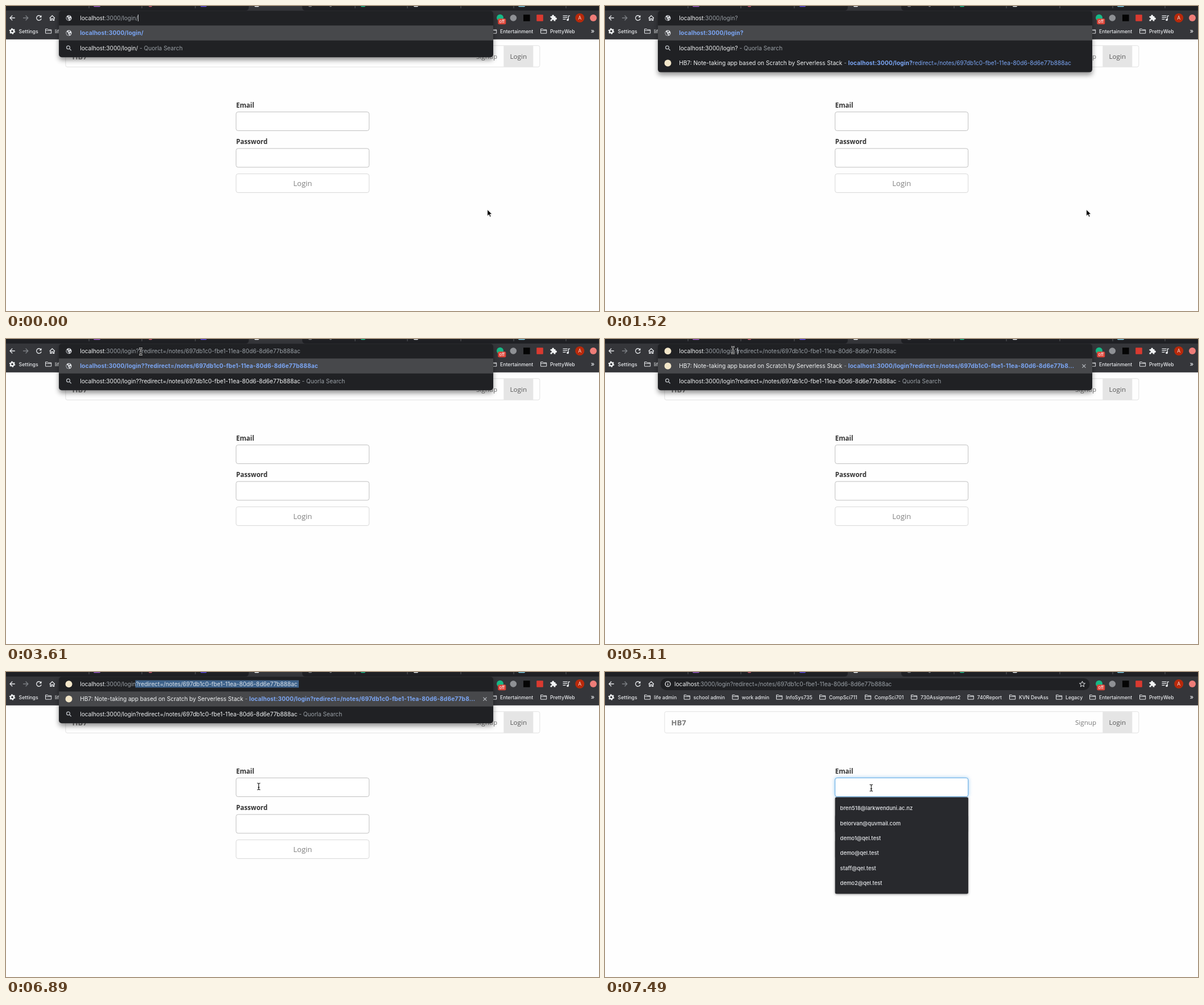
Recreate the animation shown at these times as an HTML page. Size 1043 px wide and 537 px high, loop 8 s.

```html
<!DOCTYPE html>
<html lang="en">
<head>
<meta charset="utf-8">
<title>Login redirect</title>
<style>
  html, body { margin: 0; width: 100%; height: 100%; overflow: hidden; background: #fefefe; }
  svg { display: block; width: 1043px; height: 537px; }
  text { white-space: pre; }
  .ui { font: 400 10.12px Inter, Roboto, sans-serif; fill: #9aa0a6; }
  .marks { font: 500 8.69px Inter, Roboto, sans-serif; fill: #e8eaed; }
  .mail { font: 500 9.41px Inter, Roboto, sans-serif; fill: #e8eaed; }
  .page { font: 400 11.6px "Open Sans", "Noto Sans", sans-serif; fill: #777; }
  .big { font-size: 13.03px; }
  .brand { font-weight: 700; }
  .label { font-weight: 700; fill: #333; }
  .w { fill: #f1f3f4; }
  .b { fill: #7ba6f5; font-weight: 700; letter-spacing: .17px; }
  .l { fill: #7ba6f5; }
  .field { fill: #fff; stroke: #c0c0c0; }
  .line { fill: none; stroke: #e8eaed; stroke-width: 1.3; }
  .menu { filter: drop-shadow(0 5px 4px rgba(0, 0, 0, .42)); }
  .list { filter: drop-shadow(0 1px 2px rgba(0, 0, 0, .4)); }
  .focus { fill: #fff; stroke: #66afe9; filter: drop-shadow(0 0 3px rgba(102, 175, 233, .7)); }
</style>
</head>
<body>
<svg viewBox="0 0 1043 537" xmlns="http://www.w3.org/2000/svg">
  <defs>
    <g id="globe">
      <circle r="5" fill="#dadce0"/>
      <path d="M-4 -2.6L-1 -.4L-1.2 1.6L.3 2.4L-.4 4.6Q-4.2 3.6 -4.4 0ZM.2 -4.4L2 -3.4L1 -1.6L-.8 -1.8ZM1.2 .2L3.6 .4L3.4 2.4L2 2.8Z" fill="#4a4c50"/>
    </g>
    <g id="find" class="line" style="stroke:#bdc1c6"><circle cx="-1" cy="-1" r="2.9"/><path d="M1.2 1.2L4.2 4.2"/></g>
    <circle id="site" r="6" fill="#f2e6c9"/>
    <path id="folder" class="line" style="stroke-width:1" d="M-5 3.6V-3.8H-1.2L0 -2.4H5.2V3.9H-5ZM-5 -1H5"/>
    <path id="cross" class="line" style="stroke:#bdc1c6;stroke-width:1.1" d="M-3 -3L3 3M3 -3L-3 3"/>
    <path id="ibar" d="M-2.8 -5.8Q0 -5.8 0 -4.2Q0 -5.8 2.8 -5.8M0 -4.4V4.4M-2.8 5.8Q0 5.8 0 4.2Q0 5.8 2.8 5.8M-1.5 1.6H1.5"/>
    <clipPath id="selClip"><rect id="selArea" x="227.5" y="14" width="0" height="14"/></clipPath>
  </defs>

  <!-- page -->
  <rect width="1043" height="537" fill="#fefefe"/>
  <rect x="104.8" y="69.7" width="834" height="37.6" rx="3" fill="#fefefe" stroke="#e2e2e2"/>
  <rect x="875.3" y="70.2" width="52" height="36.7" fill="#e5e5e5"/>
  <g class="page">
    <text class="big brand" x="116.5" y="93.8">HB7</text>
    <text x="827" y="93">Signup</text>
    <text x="886.6" y="93" fill="#555">Login</text>
    <text class="label" x="404.7" y="178.6">Email</text>
    <text class="label" x="404.7" y="243.2">Password</text>
    <rect class="field" x="404.7" y="186.5" width="234" height="33" rx="3.5"/>
    <rect class="field" x="404.7" y="250.9" width="234" height="33" rx="3.5"/>
    <rect class="field" x="404.7" y="295.5" width="234" height="33" rx="3.5" style="stroke:#d8d8d8"/>
    <text class="big" x="521.8" y="317.2" text-anchor="middle" fill="#808080">Login</text>
  </g>
  <rect id="focus" class="focus" x="404.7" y="186.5" width="234" height="33" rx="3.5"/>
  <g id="list"></g>

  <!-- browser frame -->
  <rect width="1043" height="58.8" fill="#35363a"/>
  <rect width="1043" height="8" fill="#1f2024"/>
  <path d="M421 8Q427 8 427 2V0H521V2Q521 8 527 8Z" fill="#35363a"/>
  <g id="tabs"></g>
  <g class="line">
    <path d="M15.8 21H7M11.2 16.8L7 21L11.2 25.2"/>
    <path d="M30 21H38.8M34.6 16.8L38.8 21L34.6 25.2" stroke="#7d8085"/>
    <path d="M61.2 18.2A4.3 4.3 0 1 0 62.1 22.2"/>
    <path d="M62.5 16V20.2H58.3Z" fill="#e8eaed" stroke="none"/>
    <path d="M76.6 21.4L81.3 17L86 21.4M78 20.6V25.4H80V22.4H82.6V25.4H84.6V20.6"/>
  </g>
  <rect x="97.5" y="11" width="755" height="21" rx="10.5" fill="#202124"/>
  <g class="line">
    <circle cx="110.5" cy="21.2" r="4.5"/>
    <path d="M110.5 20.5V23.8M110.5 18.4V19.5"/>
    <path d="M839.5 16.2L840.9 19.7L844.5 20L841.7 22.3L842.6 25.9L839.5 23.9L836.4 25.9L837.3 22.3L834.5 20L838.1 19.7Z" stroke-width="1"/>
  </g>
  <text class="ui" x="122" y="24.7"><tspan class="w">localhost</tspan>:3000/login?redirect=/notes/697db1c0-fbe1-11ea-80d6-8d6e77b888ac</text>

  <!-- extensions -->
  <circle cx="869" cy="20.8" r="6" fill="#16b886"/>
  <rect x="865.3" y="22.2" width="14" height="10" rx="2" fill="#dd4438"/>
  <text x="872.3" y="29.8" text-anchor="middle" class="ui" style="font-size:7.4px;fill:#fff">off</text>
  <circle cx="892.3" cy="21" r="5.8" fill="#8f9195"/>
  <rect x="910" y="15.2" width="11.6" height="11.6" fill="#050505"/>
  <rect x="933.2" y="15.2" width="11.6" height="11.6" rx="1" fill="#d93a30"/>
  <path d="M957.5 18H960.3A1.9 1.9 0 1 1 963.9 18H966.4V20.4A1.9 1.9 0 1 1 966.4 24V26.6H963.6A1.7 1.7 0 1 0 960.4 26.6H957.5V23.8A1.7 1.7 0 1 0 957.5 20.6Z" fill="#f1f3f4"/>
  <path class="line" d="M979.5 17.3H987.5M979.5 20.3H987.5M979.5 23.3H984.5M989.3 24V17.3H992"/>
  <circle cx="988" cy="24.3" r="1.9" fill="#e8eaed"/>
  <circle cx="1009.2" cy="21" r="8" fill="#b8290b"/>
  <text x="1009.2" y="24.2" text-anchor="middle" class="ui" style="font-size:8.6px;fill:#f4e0da">A</text>
  <circle cx="1033" cy="21" r="6" fill="#ee7d78"/>

  <!-- bookmarks -->
  <circle cx="11" cy="44.4" r="3" fill="none" stroke="#f1f3f4" stroke-width="2.4"/>
  <circle cx="11" cy="44.4" r="4.5" fill="none" stroke="#f1f3f4" stroke-width="1.6" stroke-dasharray="2.3 2.41"/>
  <g id="marks" class="marks">
    <text x="22.6" y="47.5">Settings</text>
    <text x="1028.6" y="47.6" font-size="11">»</text>
  </g>

  <g id="menus"></g>
  <g id="sel">
    <rect id="selBox" x="227.5" y="14.5" width="0" height="13" fill="#3f638b"/>
    <text class="ui" x="130.2" y="24.7" clip-path="url(#selClip)" style="fill:#d9e0e8">localhost:3000/login?redirect=/notes/697db1c0-fbe1-11ea-80d6-8d6e77b888ac</text>
  </g>
  <rect id="caret" y="15" width="1" height="12" fill="#c8cbcf"/>
  <path id="arrow" d="M0 0V11.4L2.7 8.9L4.5 13L6.4 12.2L4.7 8.2H8.2Z" fill="#000" stroke="#fff" stroke-width=".8"/>
  <g id="beam" fill="none">
    <use href="#ibar" stroke="#fff" stroke-width="2.4"/>
    <use href="#ibar" stroke="#111" stroke-width="1.1"/>
  </g>
</svg>

<script>
const $ = id => document.getElementById(id);
const use = (id, x, y) => `<use href="#${id}" x="${x}" y="${y}"/>`;
const span = (cls, s) => `<tspan class="${cls}">${s}</tspan>`;

// Tab strip remnants
$('tabs').innerHTML =
  [146, 239, 333, 614, 706, 800, 893, 985].map(x => `<rect x="${x - .5}" width="1" height="4" fill="#5a5c60"/>`).join('') +
  [[154, '#9a5bc8', 12], [251, '#c9566e', 6], [342, '#5a4be0', 11], [437, '#f1f3f4', 8], [532, '#77797d', 6],
   [569, '#77797d', 4], [624, '#19b98a', 8], [717, '#e4e6e8', 8], [901, '#7fcbe6', 12]]
    .map(([x, c, w]) => `<rect x="${x}" y="-2" width="${w}" height="3.4" rx="1.4" fill="${c}"/>`).join('');

// Bookmark folders: icon at x, label 17px further right
$('marks').innerHTML += [['life admin', 69], ['school admin', 138.6], ['work admin', 223.6], ['InfoSys735', 301],
  ['CompSci711', 377], ['CompSci701', 457], ['730Assignment2', 538], ['740Report', 637.6], ['KVN DevAss', 711],
  ['Legacy', 793], ['Entertainment', 852], ['PrettyWeb', 940]]
  .map(([s, x]) => use('folder', x + 5.5, 44.2) + `<text x="${x + 17}" y="47.5">${s}</text>`).join('');

// Saved addresses
$('list').innerHTML = '<rect class="list" x="404.7" y="220.5" width="234.2" height="170" rx="2.5" fill="#28292d"/>' +
  ['bren518@larkwenduni.ac.nz', 'belorvan@quvmail.com', 'demo1@qel.test', 'demo@qel.test', 'staff@qel.test', 'demo2@qel.test']
    .map((s, i) => `<text class="mail" x="413.6" y="${243.2 + i * 26.4}">${s}</text>`).join('');

// Address suggestions
const host = 'localhost', base = ':3000/login', note = 'redirect=/notes/697db1c0-fbe1-11ea-80d6-8d6e77b888ac';
const title = span('w', 'HB7: Note-taking app based on Scratch by Serverless Stack') + ' - ';
const rowY = i => 47.6 + i * 26.4;
const row = (i, icon, s) => use(icon, 110.5, rowY(i)) + `<text class="ui" x="130.2" y="${rowY(i) + 3.6}">${s}</text>`;

function menu(tail, icon, first, third) {
  const url = host + base + tail;
  const h = third ? 108 : 81.6;
  return '<g visibility="hidden">' +
    `<rect class="menu" x="93" y="8.6" width="764" height="${h}" rx="5" fill="#202124"/>` +
    '<rect x="93" y="34.3" width="764" height="26.4" fill="#47484b"/>' +
    use(icon, 110.5, 21.2) +
    `<text class="ui" x="130.2" y="24.7">${span('w', host)}${base + tail}</text>` +
    row(0, icon, first || span('b', url)) + (first ? use('cross', 842.4, 47.6) : '') +
    row(1, 'find', span('w', url) + ' - Quorla Search') +
    (third ? row(2, 'site', third) : '') + '</g>';
}
const login = host + base;
const hit = title + span('b', login);
$('menus').innerHTML = [
  menu('/', 'globe'),
  menu('', 'site', hit),
  menu('', 'site', hit, hit + span('l', '?' + note)),
  menu('?', 'globe', '', title + span('b', login + '?') + span('l', note)),
  menu('??' + note, 'globe'),
  menu('?' + note, 'site', title + span('b', login + '?' + note.slice(0, -4) + '...'))
].join('');
const menus = [...$('menus').children];

// [time, value...] lists; the last entry reached holds
const menuAt = [[0, 0], [450, 1], [620, 2], [920, 3], [1970, 4], [4060, 5], [7340, -1]];
const caretAt = [[0, 232], [450, 228], [920, 233], [1520, 0], [1970, 520], [2570, 0], [3020, 238], [3610, 0],
  [4060, 233], [4660, 0], [4960, 233], [5410, 228], [5560, 0]];
const mouseAt = [[0, 846.7, 358.4], [2420, 847.5, 368.5], [2570, 790, 300], [2720, 570, 150], [2870, 335, 50],
  [3020, 241, 23], [3160, 239, 22.5], [3310, 237, 22], [4510, 234, 21], [4660, 229, 19.5], [4810, 226, 19],
  [4960, 225, 19.5], [5260, 227, 19], [5410, 229, 19], [5560, 262, 17], [5710, 350, 15], [5860, 450, 14],
  [6000, 535, 14], [6150, 547, 19], [6300, 538, 62], [6440, 498, 150], [6590, 455, 211], [6740, 447, 206],
  [6890, 444.5, 201.5], [7040, 456, 203], [7190, 468.3, 204]];
const at = (list, t) => list.findLast(e => e[0] <= t);
const show = (el, on) => el.setAttribute('visibility', on ? 'visible' : 'hidden');
const start = performance.now();

function draw() {
  const t = (performance.now() - start) % 8000;
  const open = at(menuAt, t)[1], caret = at(caretAt, t)[1];
  const [, x, y] = at(mouseAt, t);
  menus.forEach((m, i) => show(m, i === open));
  show($('caret'), caret);
  $('caret').setAttribute('x', caret);

  const selecting = t >= 5560 && open >= 0;
  const width = t >= 6000 ? 287.5 : Math.max(0, Math.min(x, 515) - 227.5);
  show($('sel'), selecting);
  $('selBox').setAttribute('width', width);
  $('selArea').setAttribute('width', width);

  const inField = x > 405 && x < 639 && y > 186 && y < 220;
  const beam = t > 2420 && (y < 34 || inField);
  show($('arrow'), !beam);
  show($('beam'), beam);
  $(beam ? 'beam' : 'arrow').setAttribute('transform', `translate(${x} ${y})`);

  show($('focus'), t >= 7340);
  show($('list'), t >= 7490);
  requestAnimationFrame(draw);
}
draw();
</script>
</body>
</html>
```
